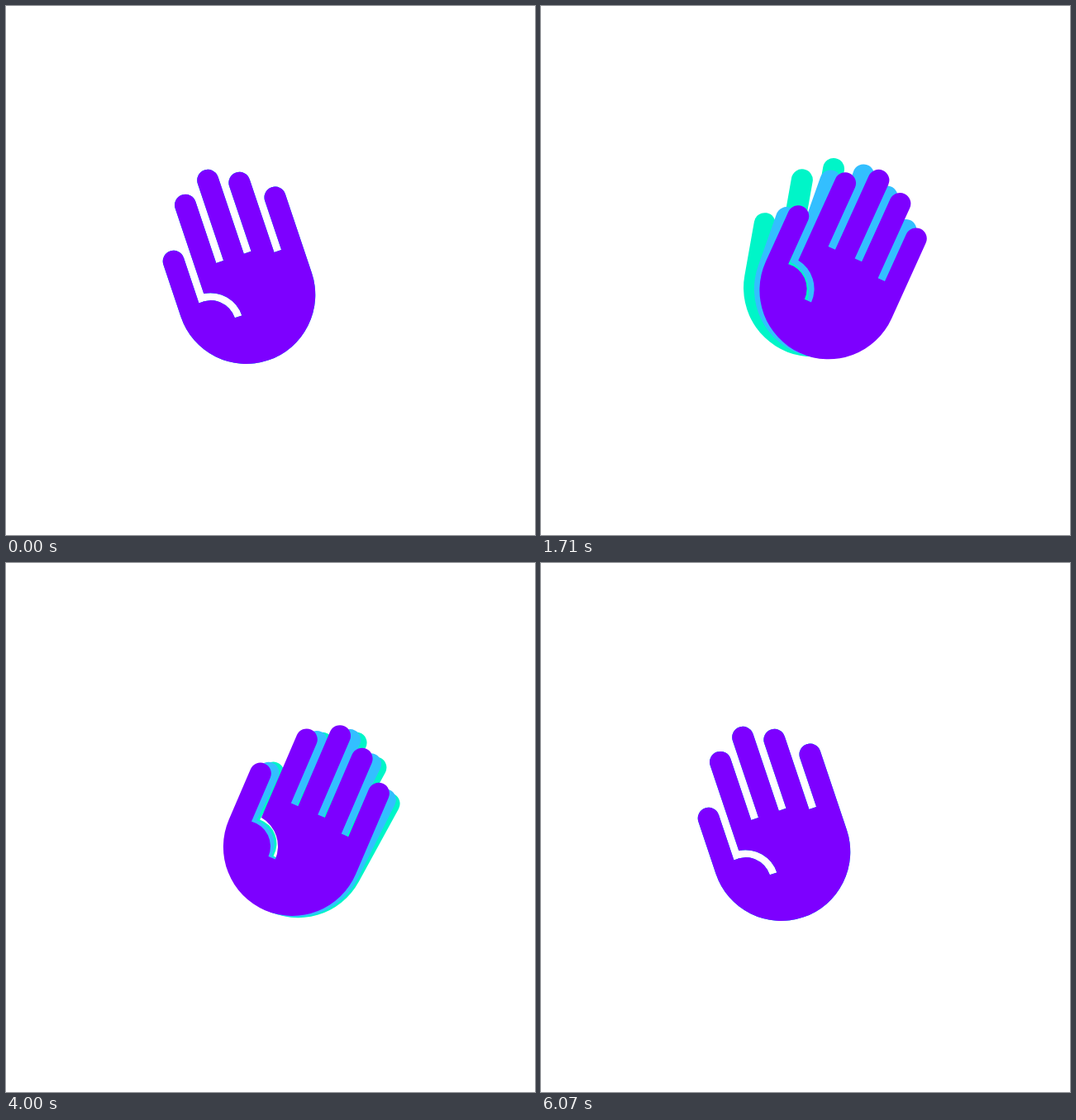
Animation, 640 px wide and 640 px high, one loop 6280 ms. Source, as an HTML page:

```html
<!DOCTYPE html>
<html lang="en">
<head>
<meta charset="utf-8">
<title>Waving hand</title>
<style>
  html, body { margin: 0; width: 100%; height: 100%; overflow: hidden; background: #fff; }
  svg { display: block; width: 100%; height: 100%; }
</style>
</head>
<body>
<svg viewBox="0 0 640 640">
  <defs>
    <!-- upright hand, origin at the centre of the palm -->
    <path id="hand" d="M-83.5 0V-66.4a13 13 0 0 1 26 0V-8.7A31 31 0 0 1-22 22h9A40 40 0 0 0-48.3-17.7
      V-126.3a13 13 0 0 1 26 0V-48H-13V-146.1a13 13 0 0 1 26 0V-48h9.3V-131.2a13 13 0 0 1 26 0V-38h9.2
      V-100.6a13 13 0 0 1 26 0V0A83.5 83.5 0 0 1-83.5 0Z"/>
  </defs>
  <use href="#hand" fill="#00f5c8"/>
  <use href="#hand" fill="#33bfff"/>
  <use href="#hand" fill="#7d00ff"/>
</svg>
<script>
const LOOP = 6280, FPS = 14;
const SWING = 2750, GO = -35, BACK = 2950, LAG = 165;
const LEFT = -18.55, RIGHT = 31.5;
const PIVOT = '326.4 419.3', PALM = '314.8 341.7';
const EASE = 0.78;
const layers = [...document.querySelectorAll('svg > use')];

// Symmetric cubic-bezier(EASE, 0, 1 - EASE, 1), solved by bisection.
function ease(x) {
  if (x <= 0) return 0;
  if (x >= 1) return 1;
  const smooth = s => s * s * (3 - 2 * s);
  let lo = 0, hi = 1;
  for (let i = 0; i < 24; i++) {
    const s = (lo + hi) / 2;
    if (smooth(s) + 3 * EASE * s * (1 - s) * (1 - 2 * s) < x) lo = s;
    else hi = s;
  }
  return smooth(lo);
}

function angle(t) {
  return LEFT + (RIGHT - LEFT) * (ease((t - GO) / SWING) - ease((t - BACK) / SWING));
}

function draw() {
  const now = performance.now() % LOOP;
  const t = Math.floor((now + 5) * FPS / 1000) * 1000 / FPS;
  layers.forEach((layer, i) => {
    const a = angle(t - (layers.length - 1 - i) * LAG);
    layer.setAttribute('transform', `rotate(${a} ${PIVOT}) translate(${PALM})`);
  });
  requestAnimationFrame(draw);
}
draw();
</script>
</body>
</html>
```
